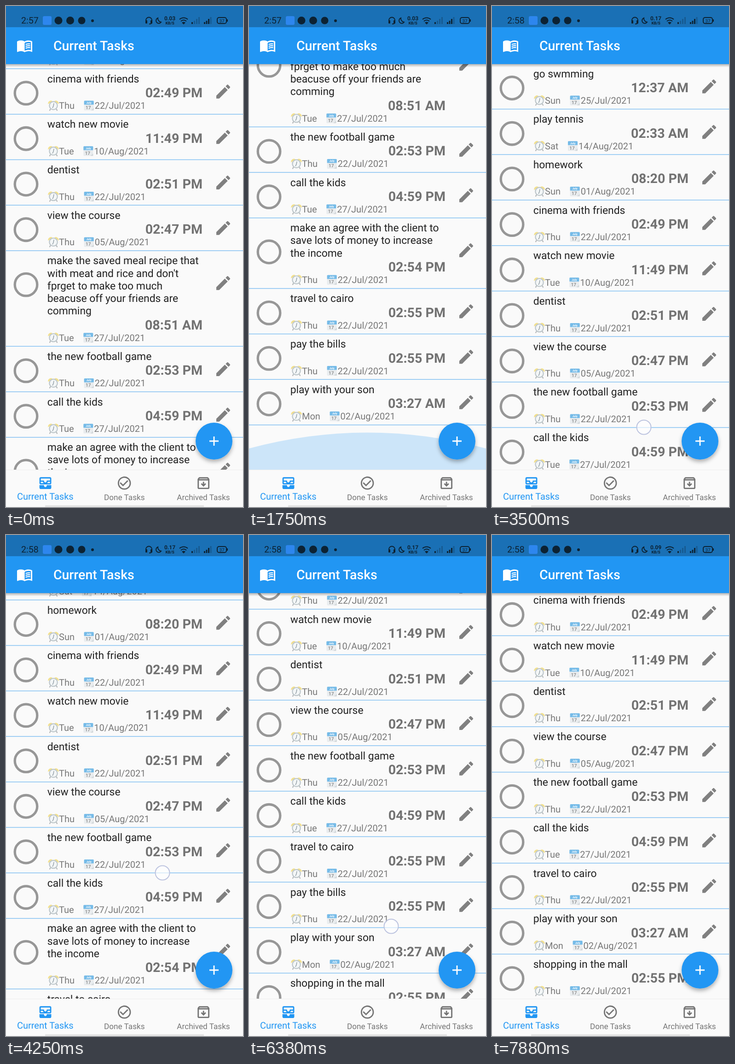
An HTML page for the animation above (8000 ms loop, 515x1087 px).

```html
<!DOCTYPE html>
<html lang="en">
<head>
<meta charset="utf-8">
<title>Task list</title>
<style>
html, body { margin: 0; width: 100%; height: 100%; overflow: hidden; background: #fafafa; }
svg { display: block; width: 100%; height: 100%; font-family: Roboto, sans-serif; text-rendering: geometricPrecision; }
.title { font-size: 22.88px; fill: #212121; }
.time { font-size: 28.6px; font-weight: 700; fill: #727272; text-anchor: end; }
.date { font-size: 20px; fill: #777; }
.tab { font-size: 17.16px; fill: #757575; text-anchor: middle; }
.active { font-size: 20px; fill: #2196f3; }
.status { fill: #0c2233; }
.line { fill: none; stroke: #0c2233; stroke-width: 2; }
</style>
</head>
<body>
<svg viewBox="0 0 515 1087">
  <defs>
    <clipPath id="view"><rect y="126" width="515" height="881"/></clipPath>
    <filter id="shade" x="-30%" y="-30%" width="160%" height="170%">
      <feDropShadow dx="0" dy="5" stdDeviation="4.5" flood-opacity=".3"/>
    </filter>
    <linearGradient id="under" x2="0" y2="1">
      <stop stop-color="#000" stop-opacity=".28"/><stop offset="1" stop-color="#000" stop-opacity="0"/>
    </linearGradient>
    <path id="pencil" fill="#808080" d="M3 17.25V21h3.75L17.81 9.94l-3.75-3.75L3 17.25zM20.71 7.04c.39-.39.39-1.02 0-1.41l-2.34-2.34c-.39-.39-1.02-.39-1.41 0l-1.83 1.83 3.75 3.75 1.83-1.83z"/>
    <g id="alarm">
      <path d="M-6 7L-8.5 11M6 7L8.5 11" stroke="#b5b8ba" stroke-width="2.2"/>
      <path d="M-11.500 -3A6.500 6.500 0 0 1 -2 -10ZM11.500 -3A6.500 6.500 0 0 0 2 -10Z" fill="#f2e08e"/>
      <circle r="8.7" fill="#f3f6f7" stroke="#bdc6ca" stroke-width="2.2"/>
      <path d="M1 -5L0 1L-2 5" fill="none" stroke="#86939b" stroke-width="1.3"/>
    </g>
    <g id="calendar">
      <rect width="21" height="21" y="-10.5" rx="1.5" fill="#e9ecee"/>
      <path d="M0 -2V-9Q0 -10.5 1.5 -10.5H19.5Q21 -10.5 21 -9V-2Z" fill="#75bbe8"/>
      <path d="M15 10.5L21 5V10.5Z" fill="#d3d8db"/>
      <text x="10.5" y="-4" font-size="6" font-weight="700" fill="#fff" text-anchor="middle">July</text>
      <text x="9" y="8" font-size="10" fill="#666" text-anchor="middle">17</text>
    </g>
  </defs>
  <rect width="515" height="1087" fill="#fafafa"/>
  <g clip-path="url(#view)">
    <g id="list"></g>
    <path id="glowBottom" fill="#2196f3" d="M0 1007V960Q257 891 515 960V1007Z"/>
    <path id="glowTop" fill="#2196f3" d="M0 126V151Q250 203 515 151V126Z"/>
    <rect y="126" width="515" height="7" fill="url(#under)"/>
  </g>

  <rect width="515" height="46" fill="#1a70b5"/>
  <rect y="46" width="515" height="80" fill="#2196f3"/>
  <g fill="#fff" transform="translate(22.5 68) scale(1.5)">
    <path d="M21 5c-1.11-.35-2.33-.5-3.5-.5-1.95 0-4.05.4-5.5 1.5-1.45-1.1-3.55-1.5-5.5-1.5S2.45 4.9 1 6v14.65c0 .25.25.5.5.5.1 0 .15-.05.25-.05C3.1 20.45 5.05 20 6.5 20c1.95 0 4.05.4 5.5 1.5 1.35-.85 3.8-1.5 5.5-1.5 1.65 0 3.35.3 4.75 1.05.1.05.15.05.25.05.25 0 .5-.25.5-.5V6c-.6-.45-1.25-.75-2-1zm0 13.5c-1.1-.35-2.3-.5-3.5-.5-1.7 0-4.15.65-5.5 1.5V8c1.35-.85 3.8-1.5 5.5-1.5 1.2 0 2.4.15 3.5.5v11.5z"/>
    <path fill="none" stroke="#fff" stroke-width="1.5" d="M13.5 10.4Q16 9 20 9.5M13.5 13.1Q16 11.7 20 12.2M13.5 15.8Q16 14.4 20 14.9"/>
  </g>
  <text x="102.9" y="95.8" font-size="28.5" font-weight="500" fill="#fff">Current Tasks</text>

  <g class="status">
    <text id="clock" x="33" y="38" font-size="19.5"></text>
    <rect x="80" y="22" width="19" height="19" rx="3" fill="#2d86ee"/>
    <circle cx="114" cy="31.5" r="8.5"/>
    <circle cx="139.5" cy="31.5" r="8.5"/>
    <circle cx="164.5" cy="31.5" r="8"/>
    <circle cx="188" cy="32" r="3"/>
    <path class="line" d="M304 33V31A6.5 6.5 0 0 1 317 31V33M317 35Q317 39 311 39"/>
    <rect x="303" y="31" width="4" height="7" rx="1"/><rect x="314" y="31" width="4" height="7" rx="1"/>
    <path class="line" d="M330 26A6 6 0 1 0 337 35A8 8 0 0 1 330 26Z"/>
    <text id="speed" x="356" y="31" font-size="12" font-weight="700" text-anchor="middle"></text>
    <text x="356" y="40" font-size="8.5" font-weight="700" text-anchor="middle">KB/S</text>
    <path class="line" d="M377 29Q386 22 395 29M380 33Q386 28 392 33"/>
    <path d="M382 36Q386 33 390 36L386 40Z"/>
    <path d="M403 35h3v4h-3zM430 35h3v4h-3zM434.5 32h3v7h-3zM439 28h3v11h-3z"/>
    <path d="M408 32h3v7h-3zM413 28h3v11h-3zM418 24h3v15h-3zM443.5 24h3v15h-3z" opacity=".28"/>
    <rect class="line" x="459" y="25" width="20" height="13" rx="4"/>
    <path d="M480 29h2v5h-2z"/>
    <text x="469" y="35.5" font-size="10" text-anchor="middle">37</text>
  </g>

  <rect y="1006" width="515" height="1" fill="#eee"/>
  <rect y="1007" width="515" height="80" fill="#fafafa"/>
  <path fill="#2196f3" transform="translate(68.4 1018) scale(1.43)" d="M19 3H5c-1.1 0-2 .9-2 2v7c0 1.1.9 2 2 2h14c1.1 0 2-.9 2-2V5c0-1.1-.9-2-2-2zM5 10h3.13c.21.78.67 1.47 1.27 2H5v-2zm14 2h-4.4c.6-.53 1.06-1.22 1.27-2H19v2zm0-4h-5v1c0 1.07-.93 2-2 2s-2-.93-2-2V8H5V5h14v3zm-5 7v1c0 .47-.19.9-.48 1.25-.37.45-.92.75-1.52.75s-1.15-.3-1.52-.75c-.29-.35-.48-.78-.48-1.25v-1H3v4c0 1.1.9 2 2 2h14c1.1 0 2-.9 2-2v-4h-7z"/>
  <path fill="#757575" transform="translate(240 1018) scale(1.43)" d="M16.59 7.58L10 14.17l-3.59-3.58L5 12l5 5 8-8zM12 2C6.48 2 2 6.48 2 12s4.48 10 10 10 10-4.48 10-10S17.52 2 12 2zm0 18c-4.42 0-8-3.58-8-8s3.58-8 8-8 8 3.58 8 8-3.58 8-8 8z"/>
  <path fill="#757575" transform="translate(412 1018) scale(1.43)" d="M20.54 5.23l-1.39-1.68C18.88 3.21 18.47 3 18 3H6c-.47 0-.88.21-1.16.55L3.46 5.23C3.17 5.57 3 6.02 3 6.5V19c0 1.1.9 2 2 2h14c1.1 0 2-.9 2-2V6.5c0-.48-.17-.93-.46-1.27zM6.24 5h11.52l.83 1H5.42l.82-1zM5 19V8h14v11H5zm11-5.5l-4 4-4-4 1.41-1.41L11 13.67V10h2v3.67l1.59-1.59z"/>
  <text class="tab active" x="85.3" y="1071">Current Tasks</text>
  <text class="tab" x="257.3" y="1072">Done Tasks</text>
  <text class="tab" x="429" y="1072">Archived Tasks</text>
  <rect x="85" y="1083" width="345" height="5" fill="#e6e6e6"/>

  <circle cx="452" cy="944" r="40" fill="#2196f3" filter="url(#shade)"/>
  <path d="M442 944h20M452 934v20" stroke="#fff" stroke-width="2.8"/>
  <circle id="touch" r="15.5" fill="#fff" fill-opacity=".62" stroke="#bcc3df" stroke-width="2"/>
</svg>
<script>
const LOOP = 8000, STEP = 125, ROW = 98.7, LINE = 27.2;
const $ = id => document.getElementById(id);

// title (| breaks lines), time, day, date; gone: removal time, enter: slide-in time
const tasks = [
  ['go swmming', '12:37 AM', 'Sun', '25/Jul/2021', { enter: 2235 }],
  ['play tennis', '02:33 AM', 'Sat', '14/Aug/2021', { enter: 2285 }],
  ['homework', '08:20 PM', 'Sun', '01/Aug/2021', { enter: 2335 }],
  ['cinema with friends', '02:49 PM', 'Thu', '22/Jul/2021', { enter: 2385 }],
  ['watch new movie', '11:49 PM', 'Tue', '10/Aug/2021'],
  ['dentist', '02:51 PM', 'Thu', '22/Jul/2021'],
  ['view the course', '02:47 PM', 'Thu', '05/Aug/2021'],
  ["make the saved meal recipe that|with meat and rice and don't|fprget to make too much|beacuse off your friends are|comming", '08:51 AM', 'Tue', '27/Jul/2021', { gone: 3125 }],
  ['the new football game', '02:53 PM', 'Thu', '22/Jul/2021'],
  ['call the kids', '04:59 PM', 'Tue', '27/Jul/2021'],
  ['make an agree with the client to|save lots of money to increase|the income', '02:54 PM', 'Thu', '22/Jul/2021', { gone: 5500 }],
  ['travel to cairo', '02:55 PM', 'Thu', '22/Jul/2021'],
  ['pay the bills', '02:55 PM', 'Thu', '22/Jul/2021', { gone: 7250 }],
  ['play with your son', '03:27 AM', 'Mon', '02/Aug/2021'],
  ['shopping in the mall', '02:55 PM', 'Thu', '22/Jul/2021', { enter: 1750 }],
];

// [time, value] pairs, linear in between
const scroll = [[0, -160], [500, -160], [1000, -420], [1250, -570], [1500, -636], [1875, -636],
  [2125, -360], [2375, 60], [2500, 125], [3500, 125], [4250, -56.4], [4500, -120], [4750, -172],
  [5000, -191.3], [6000, -191.3], [6375, -233.8], [6625, -275.5], [7249, -275.5], [7250, -176.3]];
const bottomGlow = [[1375, 0], [1500, .14], [1625, .22], [1750, .21], [2000, 0]];
const topGlow = [[2375, 0], [2500, .18], [2625, .12], [2875, 0]];
// start, end, x0, y0, x1, y1
const touches = [
  [625, 1000, 335, 785, 330, 590], [1875, 2125, 300, 480, 305, 740],
  [2250, 2625, 308, 560, 313, 893], [2875, 3000, 46, 889, 46, 889],
  [3500, 4250, 330, 914, 340, 733], [4375, 4500, 341, 702, 342, 670],
  [5250, 5375, 52, 770, 52, 770], [6000, 6375, 306, 891, 309, 849],
  [6500, 6625, 310, 828, 311, 808], [7000, 7125, 48, 763, 48, 763],
];

function at(keys, t) {
  const i = keys.findIndex(k => k[0] > t);
  if (i < 0) return keys[keys.length - 1][1];
  if (i === 0) return keys[0][1];
  const [t0, a] = keys[i - 1], [t1, b] = keys[i];
  return a + (b - a) * (t - t0) / (t1 - t0);
}

const rows = tasks.map(([title, time, day, date, { gone = Infinity, enter } = {}]) => {
  const lines = title.split('|'), extra = (lines.length - 1) * LINE;
  const height = ROW + extra, mid = extra ? 20.7 : 0;
  const node = document.createElementNS('http://www.w3.org/2000/svg', 'g');
  node.innerHTML = `<g>
    <circle cx="43.5" cy="${53 + mid}" r="24.3" fill="none" stroke="#979797" stroke-width="5.3"/>
    ${lines.map((s, i) => `<text class="title" x="89.7" y="${29.5 + i * LINE}">${s}</text>`).join('')}
    <text class="time" x="427" y="${62 + extra}">${time}</text>
    <use href="#alarm" x="103" y="${80 + extra}"/>
    <text class="date day" x="115" y="${87 + extra}">${day}</text>
    <use class="cal" href="#calendar" y="${80 + extra}"/>
    <text class="date when" y="${87 + extra}">${date}</text>
    <use href="#pencil" transform="translate(452 ${29.5 + mid}) scale(1.67)"/>
  </g><rect y="${height - .8}" width="515" height="1.5" fill="#84c1f2"/>`;
  $('list').append(node);
  const calX = 115 + node.querySelector('.day').getComputedTextLength() + 20.7;
  node.querySelector('.cal').setAttribute('x', calX);
  node.querySelector('.when').setAttribute('x', calX + 23);
  return { node, body: node.firstElementChild, height, gone, enter };
});

function drawRows(t) {
  let y = at(scroll, t);
  for (const { node, body, height, gone, enter } of rows) {
    const shown = t < gone;
    node.style.display = shown ? '' : 'none';
    if (!shown) continue;
    node.setAttribute('transform', `translate(0 ${y})`);
    const waiting = enter && t > 1000;
    const p = waiting ? Math.min(1, Math.max(0, (t - enter) / 375)) : 1;
    body.setAttribute('transform', `translate(0 ${50 * (1 - p) ** 3})`);
    body.setAttribute('opacity', 1 - (1 - p) ** 3);
    y += height;
  }
}

function drawTouch(t) {
  const hit = touches.find(([a, b]) => t >= a && t <= b);
  $('touch').style.display = hit ? '' : 'none';
  if (!hit) return;
  const [a, b, x0, y0, x1, y1] = hit, p = (t - a) / (b - a);
  $('touch').setAttribute('cx', x0 + (x1 - x0) * p);
  $('touch').setAttribute('cy', y0 + (y1 - y0) * p);
}

function draw(t) {
  drawRows(t);
  drawTouch(t);
  $('glowBottom').setAttribute('opacity', at(bottomGlow, t));
  $('glowTop').setAttribute('opacity', at(topGlow, t));
  $('clock').textContent = t < 2250 ? '2:57' : '2:58';
  $('speed').textContent = t < 3000 ? '0.03' : t < 7000 ? '0.17' : '0.09';
}

const start = performance.now();
function tick() {
  const t = (performance.now() - start) % LOOP;
  draw(Math.floor((t + 1) / STEP) * STEP % LOOP);
  requestAnimationFrame(tick);
}
tick();
</script>
</body>
</html>
```
